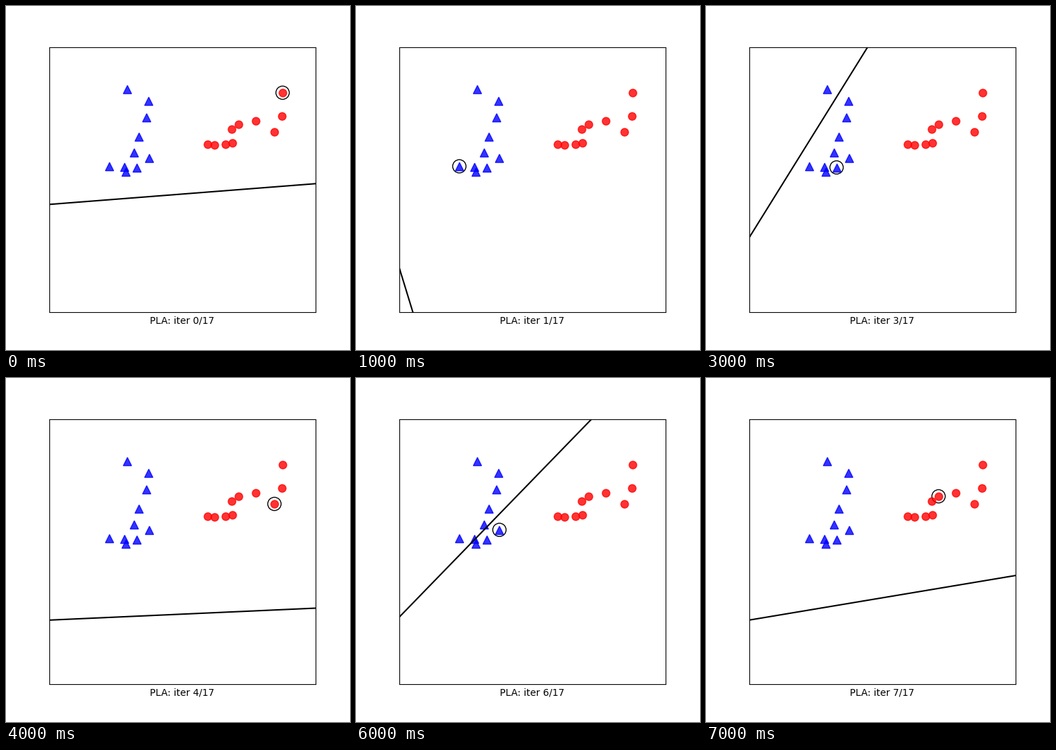
A matplotlib script that plays this animation: 500 by 500 pixels, repeating every 8 s.

```python
import numpy as np
import matplotlib.pyplot as plt
from matplotlib.animation import FuncAnimation

STEPS, TOTAL = 8, 17

blue = np.array([
    (1.757, 3.049), (2.237, 2.784), (2.190, 2.410), (2.021, 1.974),
    (1.917, 1.616), (2.260, 1.495), (1.358, 1.304), (1.695, 1.288),
    (1.971, 1.278), (1.726, 1.179),
])
red = np.array([
    (3.569, 1.803), (3.724, 1.787), (3.972, 1.803), (4.126, 1.834),
    (4.111, 2.145), (4.266, 2.255), (4.653, 2.333), (5.073, 2.083),
    (5.241, 2.442), (5.257, 2.971),
])
points = np.vstack([blue, red])
labels = np.repeat([1, -1], [len(blue), len(red)])

# misclassified point picked at each iteration
picks = [19, 6, 4, 8, 17, 2, 5, 15]


def perceptron(w):
    """Weights (bias, x, y) before each update."""
    history = [w]
    for i in picks[:-1]:
        w = w + labels[i] * np.array([1, *points[i]])
        history.append(w)
    return history


weights = perceptron(np.array([-0.59, -0.105, 1.34]))

fig, ax = plt.subplots(figsize=(5, 5), dpi=100)
fig.subplots_adjust(left=0.125, right=0.9, bottom=0.11, top=0.88)
ax.plot(*blue.T, "b^", markersize=8, alpha=0.8)
ax.plot(*red.T, "ro", markersize=8, alpha=0.8)
boundary, = ax.plot([], [], "k", linewidth=1.5)
ring = plt.Circle((0, 0), 0.15, color="k", fill=False)
ax.add_artist(ring)
ax.axis([0, 6, -2, 4])
ax.set_xticks([])
ax.set_yticks([])


def update(i):
    bias, wx, wy = weights[i]
    x = np.array([-100, 100])
    boundary.set_data(x, -(bias + wx * x) / wy)
    ring.center = tuple(points[picks[i]])
    ax.set_xlabel(f"PLA: iter {i}/{TOTAL}")
    return boundary, ring


anim = FuncAnimation(fig, update, frames=STEPS, interval=1000, repeat=True)
plt.show()
```
